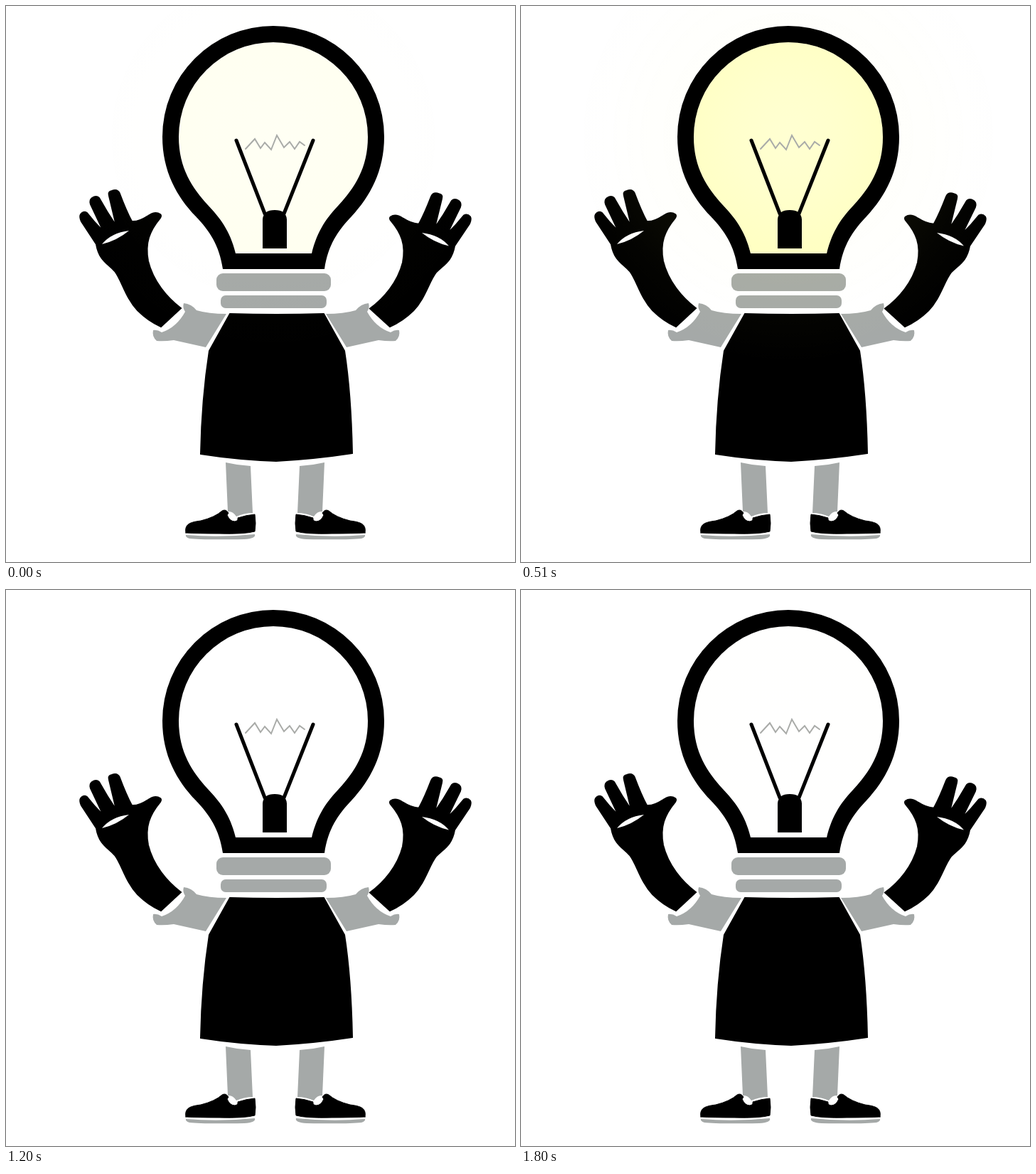
Write an HTML page with a canvas that moves like this. It is 716 px wide and 782 px high and loops after 1.83 s.

```html
<!DOCTYPE html>
<html lang="en">
<head>
<meta charset="utf-8">
<title>Flickering bulb</title>
<style>
  html, body { margin: 0; width: 100%; height: 100%; overflow: hidden; background: #fff; }
  canvas { display: block; }
</style>
</head>
<body>
<canvas id="stage" width="716" height="782"></canvas>
<script>
const ctx = document.getElementById('stage').getContext('2d');
const WIDTH = 716, HEIGHT = 782;
const LOOP = 1830, STEP = 30;
const GREY = '#a5a9a8', BLACK = '#000', WHITE = '#fff';
const CENTER = [376, 185];

const bulbOuter = new Path2D('M305 370 C300 336 286 316 267 296 C240 268 220 232 220 184 A156 156 0 0 1 532 184 C532 232 512 268 486 296 C467 316 453 336 448 370Z');
const bulbInner = new Path2D('M323 348 C315 315 300 297 284 280 C262 256 243 228 243 184 A133 133 0 0 1 509 184 C509 228 490 256 468 280 C452 297 438 315 430 348Z');
const stem = new Path2D('M361 341 V300 Q362 287 378 287 Q394 287 395 300 V341Z');
const wires = new Path2D('M324 189 L364 292 M432 189 L391 292');
const filament = new Path2D('M337 201 L350 187 L358 200 L364 192 L373 202 L381 182 L391 199 L399 191 L406 201 L413 191 L420 196');
const apron = new Path2D('M315 433 Q380 435 447 433 L476 485 C483 530 486 580 487 629 Q435 637 380 640 Q325 638 274 630 C275 580 279 530 286 485Z');
const sleeve = new Path2D('M310 433 L281 480 L236 470 Q222 472 212 471 Q205 465 207 456 Q213 455 219 459 Q240 452 252 430 Q248 424 250 418 Q261 419 268 428 Q285 433 310 433Z');
const glove = new Path2D('M217 293 Q210 288 200 295 Q186 304 177 303 Q169 288 160 264 Q157 257 149 260 Q143 261 145 267 L155 309 Q142 290 131 270 Q127 266 121 270 Q117 273 119 279 L137 317 Q124 304 114 291 Q109 288 105 293 Q103 296 106 303 L127 335 C131 358 143 362 153 373 C163 386 168 410 185 428 Q200 443 218 451 L246 425 C226 410 207 387 200 359 C195 333 202 316 217 298 Q219 295 217 293Z');
const crease = new Path2D('M135 335 Q148 319 173 316 Q156 330 135 335Z');
const leg = new Path2D('M309 642 Q326 646 344 647 L347 713 Q336 713 324 718 Q319 710 312 711Z');
const shoe = new Path2D('M253 741 C251 729 258 726 274 724 Q294 719 304 710 Q309 707 313 713 L311 716 Q315 725 322 725 Q327 724 326 720 Q338 716 350 715 Q352 728 350 739 Q335 743 300 742 Q270 742 253 741Z');
const sole = new Path2D('M253 744 Q300 748 350 743 Q352 749 335 750 Q275 751 258 749 Q252 747 253 744Z');

// Brightness keys: [ms, level]
const KEYS = [[-40, 0], [195, 1], [390, 0.03], [745, 1], [985, 1], [1195, 0], [1390, 1], [1450, 1], [1790, 0], [2025, 1]];

function brightness(t) {
  const i = KEYS.findIndex(key => key[0] > t);
  const [t0, a] = KEYS[i - 1], [t1, b] = KEYS[i];
  const ease = (1 - Math.cos(Math.PI * (t - t0) / (t1 - t0))) / 2;
  return a + (b - a) * ease;
}

function fill(path, color) {
  ctx.fillStyle = color;
  ctx.fill(path);
}

function stroke(path, color, width) {
  ctx.strokeStyle = color;
  ctx.lineWidth = width;
  ctx.stroke(path);
}

function ink(path, edge) {
  fill(path, BLACK);
  stroke(path, BLACK, edge);
}

function bar(x, y, w, h, r) {
  ctx.beginPath();
  ctx.roundRect(x, y, w, h, r);
  ctx.fillStyle = GREY;
  ctx.fill();
}

function mirrored(sum, draw, scaleY = 1, pivotY = 0) {
  draw();
  ctx.save();
  ctx.transform(-1, 0, 0, scaleY, sum, pivotY * (1 - scaleY));
  draw();
  ctx.restore();
}

function radial(radius, stops) {
  const gradient = ctx.createRadialGradient(...CENTER, 0, ...CENTER, radius);
  stops.forEach(([at, color]) => gradient.addColorStop(at, color));
  return gradient;
}

function cover(style, mode) {
  ctx.globalCompositeOperation = mode;
  ctx.fillStyle = style;
  ctx.fillRect(0, 0, WIDTH, HEIGHT);
  ctx.globalCompositeOperation = 'source-over';
}

function drawBody() {
  mirrored(760, () => fill(sleeve, GREY));
  mirrored(758, () => { ink(glove, 2); fill(crease, WHITE); }, 0.978, 451);
  mirrored(757, () => fill(leg, GREY));
  mirrored(758, () => { ink(shoe, 1); fill(sole, GREY); });
  ink(apron, 2);
  bar(296, 376, 161, 25, 9);
  bar(302, 407, 149, 18, 7);
}

// The light tints the figure more strongly than the white behind it.
function drawLight(level) {
  const halo = strength => {
    const tint = alpha => `rgba(255,255,85,${alpha * strength * level})`;
    return radial(320, [[0, tint(0.22)], [0.48, tint(0.2)], [0.62, tint(0.15)], [0.8, tint(0.055)], [1, tint(0)]]);
  };
  cover(halo(1), 'source-atop');
  cover(halo(0.35), 'destination-over');
  cover(WHITE, 'destination-over');
}

function drawBulb(level) {
  fill(bulbOuter, BLACK);
  fill(bulbInner, WHITE);
  ctx.globalAlpha = level;
  fill(bulbInner, radial(160, [[0, '#ffff5e'], [0.5, '#ffff48'], [1, '#ffff28']]));
  ctx.globalAlpha = 1;
  stroke(filament, '#a9aba8', 2);
  stroke(wires, BLACK, 5);
  fill(stem, BLACK);
}

function frame(now) {
  const level = brightness(Math.floor((now % LOOP) / STEP) * STEP);
  ctx.clearRect(0, 0, WIDTH, HEIGHT);
  drawBody();
  drawLight(level);
  drawBulb(level);
  requestAnimationFrame(frame);
}

ctx.lineCap = 'round';
requestAnimationFrame(frame);
</script>
</body>
</html>
```
